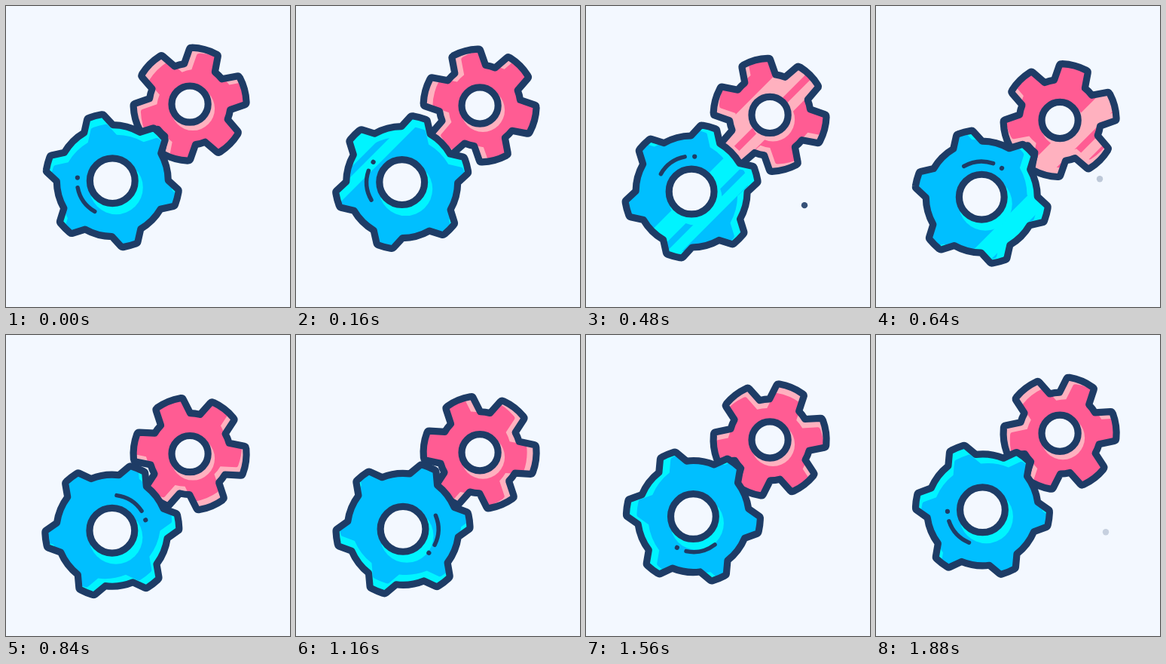
An HTML page with a canvas for the animation above (1.92 s loop, 377x399 px).

```html
<!DOCTYPE html>
<html lang="en">
<head>
<meta charset="utf-8">
<title>Gears</title>
<style>
html, body { margin: 0; width: 100%; height: 100%; overflow: hidden; background: #f3f8ff; }
canvas { display: block; }
</style>
</head>
<body>
<canvas id="stage" width="377" height="399"></canvas>
<script>
const ctx = document.getElementById('stage').getContext('2d');
const LOOP = 1920, STEP = 40, TAU = Math.PI * 2, RAD = Math.PI / 180;
const NAVY = '#1e3c66', PAPER = '#f3f8ff';

const pink = {
  main: '#ff5c93', light: '#ffb1bf', dir: -1, first: 45,
  tip: 75, root: 54, tipHalf: 15, rootHalf: 23, corner: 3,
  shift: [9.8, 7.7], hole: 24.1, crescent: [4, 6, 29],
  gleam: { start: -238, speed: 0.4, bands: [[0, 40], [53, 72]] }
};
const blue = {
  main: '#00bfff', light: '#00f4ff', dir: 1, first: 15,
  tip: 89, root: 74, tipHalf: 7, rootHalf: 15.5, corner: 3,
  shift: [5, 13], hole: 29.9, crescent: [5, 9, 35.5],
  gleam: { start: -184, speed: 0.38, bands: [[0, 36], [48, 68]] }
};

function gearPath(g) {
  const p = new Path2D();
  const at = (r, deg) => [r * Math.cos(deg * RAD), r * Math.sin(deg * RAD)];
  for (let i = 0; i < 6; i++) {
    const a = g.first + i * 60;
    if (i === 0) p.moveTo(...at(g.root, a - g.rootHalf));
    else p.arc(0, 0, g.root, (a - 60 + g.rootHalf) * RAD, (a - g.rootHalf) * RAD);
    const c = g.corner / g.tip / RAD;
    p.arcTo(...at(g.tip, a - g.tipHalf), ...at(g.tip, a), g.corner);
    p.arc(0, 0, g.tip, (a - g.tipHalf + c) * RAD, (a + g.tipHalf - c) * RAD);
    p.arcTo(...at(g.tip, a + g.tipHalf), ...at(g.root, a + g.rootHalf), g.corner);
    p.lineTo(...at(g.root, a + g.rootHalf));
  }
  p.arc(0, 0, g.root, (g.first + 300 + g.rootHalf) * RAD, (g.first + 360 - g.rootHalf) * RAD);
  p.closePath();
  return p;
}
pink.path = gearPath(pink);
blue.path = gearPath(blue);

function disc(x, y, r, fill) {
  ctx.beginPath();
  ctx.arc(x, y, r, 0, TAU);
  ctx.fillStyle = fill;
  ctx.fill();
}

// Diagonal bands measured by x + y from the gear's centre
function drawGleam(g, t) {
  const { start, speed, bands } = g.gleam;
  const lead = start + speed * t;
  ctx.fillStyle = g.light;
  for (const [a, b] of bands) {
    const p = lead + a, q = lead + b;
    ctx.beginPath();
    ctx.moveTo(p + 120, -120);
    ctx.lineTo(q + 120, -120);
    ctx.lineTo(q - 120, 120);
    ctx.lineTo(p - 120, 120);
    ctx.fill();
  }
}

function drawGear(g, x, y, t) {
  const turn = g.dir * TAU * t / LOOP;
  ctx.save();
  ctx.translate(x, y);

  ctx.save();
  ctx.rotate(turn);
  ctx.fillStyle = g.light;
  ctx.fill(g.path);
  ctx.clip(g.path);
  ctx.translate(...g.shift);
  ctx.fillStyle = g.main;
  ctx.fill(g.path);
  ctx.translate(-g.shift[0], -g.shift[1]);
  ctx.rotate(-turn);
  drawGleam(g, t);
  disc(...g.crescent, g.light);
  ctx.restore();

  ctx.lineWidth = 9.2;
  ctx.lineJoin = ctx.lineCap = 'round';
  ctx.strokeStyle = NAVY;
  disc(0, 0, g.hole, PAPER);
  ctx.stroke();
  ctx.rotate(turn);
  ctx.stroke(g.path);

  if (g === blue) {
    ctx.lineWidth = 5.5;
    ctx.beginPath();
    ctx.arc(0, 0, 47, 120 * RAD, 169 * RAD);
    ctx.stroke();
    disc(-46.4, -4.1, 3.1, NAVY);
  }
  ctx.restore();
}

function drawMote(t, start, end, x, y, dx, dy, peak) {
  if (t <= start || t >= end) return;
  const k = (t - start) / (end - start);
  ctx.globalAlpha = Math.min(1, peak * Math.sin(Math.PI * k));
  disc(x + dx * k, y + dy * k, 4.2, NAVY);
  ctx.globalAlpha = 1;
}

function render(now) {
  const t = Math.floor((now % LOOP) / STEP) * STEP;
  const a = TAU * t / LOOP, bob = -14.3 * Math.cos(a);
  ctx.fillStyle = PAPER;
  ctx.fillRect(0, 0, 377, 399);
  drawGear(pink, 244.1, 144.4 + bob, t);
  drawGear(blue, 141.3 - 1.2 * Math.sin(a), 246 + bob, t);
  drawMote(t, 240, 680, 279.5, 316.5, 19.3, -96, 0.9);
  drawMote(t, 1600, 1900, 294, 306, 11.8, -48, 1);
}

const begin = performance.now();
function tick() {
  render(performance.now() - begin);
  requestAnimationFrame(tick);
}
render(0);
tick();
</script>
</body>
</html>
```
